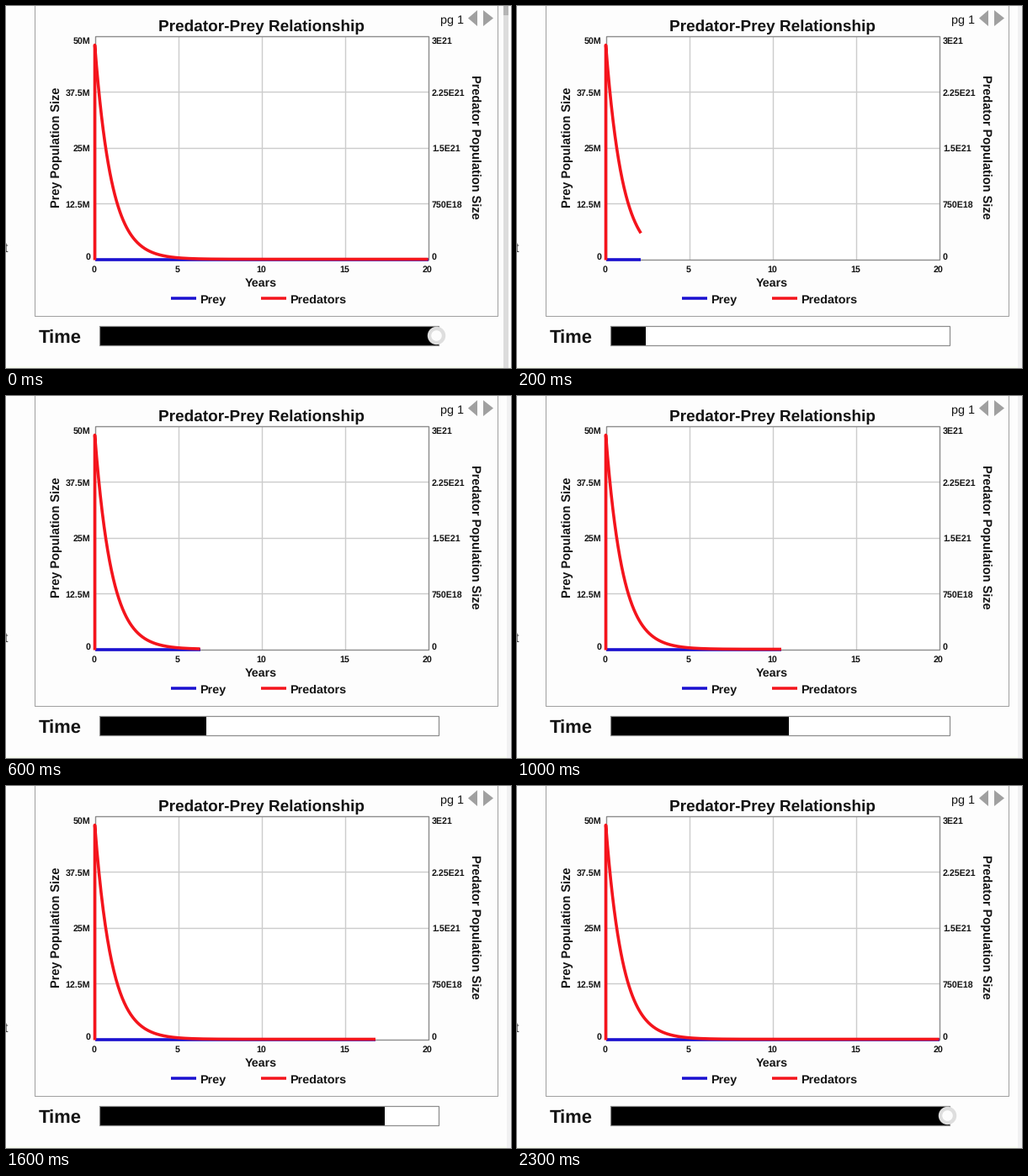
A matplotlib script that plays this animation: 600x431 px, repeating every 2.4 s.

```python
import numpy as np
import matplotlib.pyplot as plt
from matplotlib.animation import FuncAnimation
from matplotlib.patches import Circle, Polygon, Rectangle

W, H, DPI = 600, 431, 64  # a power of two keeps the pixel size exact
FRAMES, STEP = 24, 100
RUN = 1900  # ms until the simulation reaches year 20
LEFT, RIGHT, TOP, BASE = 105.5, 501.5, 35.5, 301.5
BAR_X, BAR_Y, BAR_W, BAR_H = 110.5, 380.5, 403, 23
BLUE, RED, FRAME_GREY = "#1a10d0", "#f4141c", "#8c8c8c"

plt.rcParams["font.family"] = "Liberation Sans"
plt.rcParams["text.hinting"] = "none"

fig = plt.figure(figsize=(W / DPI, H / DPI), dpi=DPI, facecolor="#fdfdfd")
ax = fig.add_axes([0, 0, 1, 1])
ax.set_xlim(0, W)
ax.set_ylim(H, 0)
ax.axis("off")


def pt(px):
    return px * 72 / DPI


def label(x, y, s, size, ha="left", weight="bold", angle=0, color="#141414"):
    ax.text(x, y, s, fontsize=pt(size), ha=ha, va="baseline", weight=weight,
            rotation=angle, rotation_mode="anchor", color=color)


def line(xs, ys, color, width, z=2):
    return ax.plot(xs, ys, color=color, lw=pt(width), zorder=z,
                   solid_capstyle="butt", solid_joinstyle="round")[0]


def box(x, y, w, h, color, z=1):
    patch = Rectangle((x, y), w, h, fc=color, ec="none", zorder=z)
    return ax.add_patch(patch)


# Page edges
box(0, 429, W, 2, "#f9fdf3")
soft_edge = box(595, 0, 5, H, "#f1f1f2")
scroll_track = box(591, 0, 6, H, "#dcdcdc")
scroll_thumb = box(591, 0, 6, 11, "#b4b4b4")
label(2.5, 293, "t", 16, ha="right", weight="normal", color="#444444")

# Panel and page control
line([33.5, 33.5, 583.5, 583.5], [-2, 368.5, 368.5, -2], "#a0a0a0", 1)
label(516, 21, "pg 1", 14.4, weight="normal")
for tip, back in ((549, 560), (579, 567)):
    ax.add_patch(Polygon([(tip, 14.5), (back, 5), (back, 24)],
                         fc="#a0a0a0", ec="none"))

# Chart
box(LEFT, TOP, RIGHT - LEFT, BASE - TOP, "#ffffff")
for i in range(1, 4):
    gx = LEFT + (RIGHT - LEFT) * i / 4
    gy = TOP + (BASE - TOP) * i / 4
    line([gx, gx], [TOP, BASE], "#cccccc", 1.4)
    line([LEFT, RIGHT], [gy, gy], "#cccccc", 1.4)
line([LEFT, RIGHT, RIGHT, LEFT, LEFT], [TOP, TOP, BASE, BASE, TOP],
     FRAME_GREY, 1.4)

label(303.5, 30, "Predator-Prey Relationship", 19, ha="center")
label(64, 240.5, "Prey Population Size", 14.5, angle=90)
label(553.5, 81.5, "Predator Population Size", 14.5, angle=-90)
label(303, 333.5, "Years", 14.2, ha="center")

rows = zip((45, 106.5, 173, 240, 302),
           ("50M", "37.5M", "25M", "12.5M", "0"),
           ("3E21", "2.25E21", "1.5E21", "750E18", "0"))
for y, prey_tick, pred_tick in rows:
    label(100, y, prey_tick, 10.6, ha="right")
    label(506, y, pred_tick, 10.6)
for i in range(5):
    label(105 + 99 * i, 317, str(5 * i), 10.6, ha="center")

line([196, 226], [348, 348], BLUE, 3.5)
line([303, 332.5], [348, 348], RED, 3.5)
label(230.5, 354, "Prey", 14.4)
label(337, 354, "Predators", 14.4)

prey = line([], [], BLUE, 3.6, 4)
predators = line([], [], RED, 3.6, 5)

# Time slider
label(38.5, 402, "Time", 22)
box(BAR_X, BAR_Y, BAR_W, BAR_H, "#ffffff")
fill = box(BAR_X, BAR_Y, 0, BAR_H, "#000000", 3)
ax.add_patch(Rectangle((BAR_X, BAR_Y), BAR_W, BAR_H, fc="none",
                       ec=FRAME_GREY, lw=pt(1.2), zorder=4))
knob = [ax.add_patch(Circle((511.5, 392.5), r, fc=c, ec="none", zorder=z))
        for r, c, z in ((10.7, "#dedede", 6), (6.3, "#fcfcfc", 7))]


def update(frame):
    rest = frame == 0
    done = 1 if rest else min(frame * STEP / RUN, 1)

    end = LEFT + (RIGHT - LEFT) * done
    years = np.linspace(0, 20 * done, 400)
    xs = LEFT + (end - LEFT) * np.linspace(0, 1, 400)
    ys = BASE - 255 * np.exp(-years)
    predators.set_data(np.r_[LEFT, xs], np.r_[BASE + 1, ys])
    prey.set_data([LEFT, end], [BASE, BASE])
    fill.set_width(BAR_W * done)

    for part in knob:
        part.set_visible(rest or frame * STEP > RUN)
    scroll_track.set_visible(rest)
    scroll_thumb.set_visible(rest)
    soft_edge.set_visible(not rest)
    return [predators, prey, fill, scroll_track, scroll_thumb, soft_edge, *knob]


anim = FuncAnimation(fig, update, frames=FRAMES, interval=STEP,
                     repeat=True, repeat_delay=0, blit=False)
plt.show()
```
